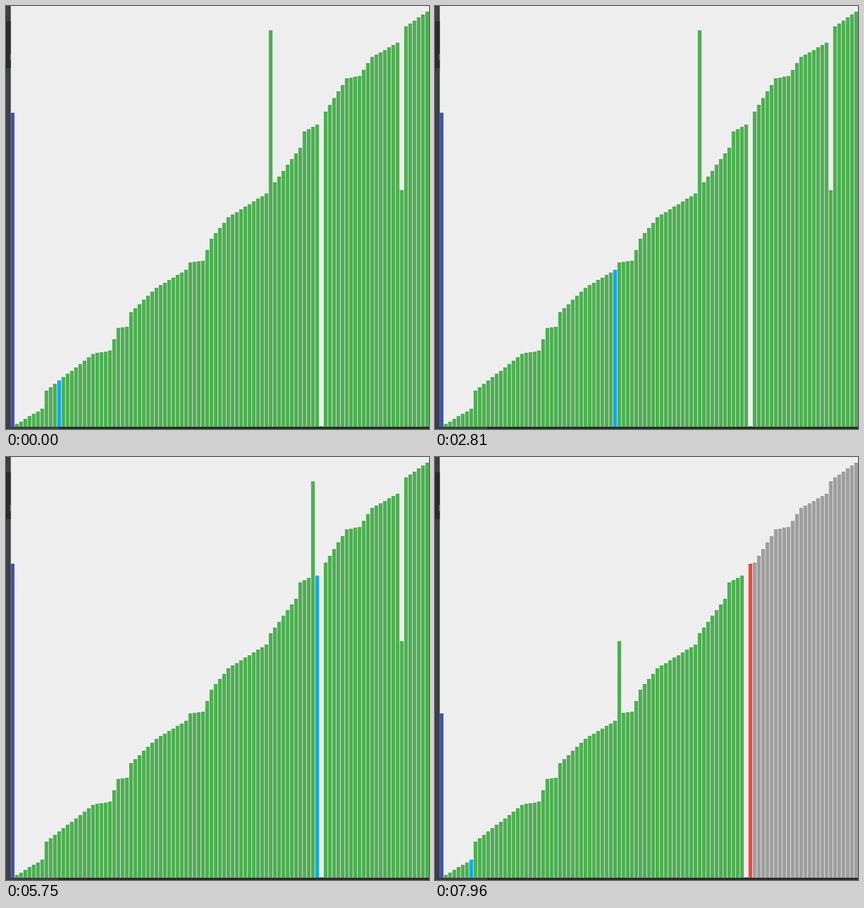
A matplotlib script that plays this animation: 748 px wide and 749 px high, repeating every 8000 ms.

```python
import numpy as np
import matplotlib.pyplot as plt
from matplotlib.animation import FuncAnimation
from matplotlib.collections import PolyCollection
from matplotlib.patches import Polygon, Rectangle

W, H, DPI = 748, 749, 64
LOOP, STEP = 8000, 20
COUNT, FLOOR = 99, 745
LEFT, PITCH, BAR_WIDTH = 8.46, 7.48, 6.5

BACKGROUND, BAR, PIVOT = "#eeeeee", "#4caf50", "#3f51b5"
SCAN, END, INACTIVE = "#03a9f4", "#f44336", "#9e9e9e"
PANEL, DARK = "#3c3f41", "#2b2b2b"

# Key points (bar, top edge) of the nearly sorted slope, and the bars off it.
SLOPE = [
    (1, 740), (7, 713), (8, 681), (19, 616), (23, 610), (25, 570), (27, 568),
    (28, 542), (34, 499), (41, 467), (42, 454), (45, 451), (47, 412),
    (51, 374), (60, 332), (68, 251), (69, 222), (72, 210), (79, 128),
    (82, 124), (85, 90), (91, 65), (93, 36), (98, 10),
]
OUTLIERS = {0: 189, 61: 43, 73: 744, 92: 326}
NEXT_PIVOT = 42

# Nearly constant pace: (time in ms, sorting step).
PACE = [(0, 21.2), (4710, 120.1), (6580, 159.3), (7210, 171), (LOOP, 186.9)]


def initial_tops():
    tops = np.rint(np.interp(range(COUNT), *zip(*SLOPE))).tolist()
    for i, top in OUTLIERS.items():
        tops[i] = top
    return tops


def partition(tops, end):
    """Yield (tops, scanned bar, end) after each comparison and swap."""
    store = 0
    for j in range(1, end):
        yield tuple(tops), j, end
        if tops[j] > tops[0]:
            store += 1
            tops[store], tops[j] = tops[j], tops[store]
            yield tuple(tops), j, end
    tops[0], tops[store] = tops[store], tops[0]
    yield tuple(tops), None, end


def sort_steps():
    tops = initial_tops()
    pivot = tops[0]
    yield from partition(tops, COUNT)
    end = tops.index(pivot)
    yield tuple(tops), None, end
    tops[0], tops[NEXT_PIVOT] = tops[NEXT_PIVOT], tops[0]
    yield tuple(tops), None, end
    yield from partition(tops, end)


def bar_color(i, scanned, end):
    if i == 0:
        return PIVOT
    if i == scanned:
        return SCAN
    if i == end:
        return END
    return INACTIVE if i > end else BAR


def bar_outline(i, top):
    x0 = LEFT + PITCH * i
    x1 = x0 + BAR_WIDTH
    return [(x0, FLOOR), (x0, top), (x1, top), (x1, FLOOR)]


def box(x0, y0, x1, y1, color):
    ax.add_patch(Rectangle((x0, y0), x1 - x0, y1 - y0, fc=color, lw=0, snap=False))


steps = list(sort_steps())

fig = plt.figure(figsize=(W / DPI, H / DPI), dpi=DPI, facecolor=BACKGROUND)
ax = fig.add_axes([0, 0, 1, 1])
ax.set(xlim=(0, W), ylim=(H, 0))
ax.axis("off")

# Window edges around the canvas
box(0, 0, LEFT, H, PANEL)
box(0, 27, LEFT, 110, DARK)
box(7, 85, LEFT, 96, "#4a9a6c")
box(0, FLOOR, 93, H, PANEL)
box(93, FLOOR, W, H, DARK)

bars = PolyCollection([], linewidths=0, edgecolors="none", snap=False)
ax.add_collection(bars, autolim=False)

ARROW = [(0, 0), (0, 15.5), (3.6, 12.2), (6.2, 18), (8.6, 17), (6.1, 11.3), (10, 11)]
cursor = Polygon(np.add(ARROW, (717.5, 648.5)), fc="white", ec="black", lw=0.9, zorder=5)
ax.add_patch(cursor)


def draw(frame):
    t = (frame + 0.5) * STEP
    tops, scanned, end = steps[int(np.interp(t, *zip(*PACE)))]
    bars.set_verts([bar_outline(i, top) for i, top in enumerate(tops)])
    bars.set_facecolor([bar_color(i, scanned, end) for i in range(COUNT)])
    cursor.set_visible(1100 <= t < 1170)
    return bars, cursor


anim = FuncAnimation(fig, draw, frames=LOOP // STEP, interval=STEP,
                     repeat=True, repeat_delay=0, blit=False)
plt.show()
```
